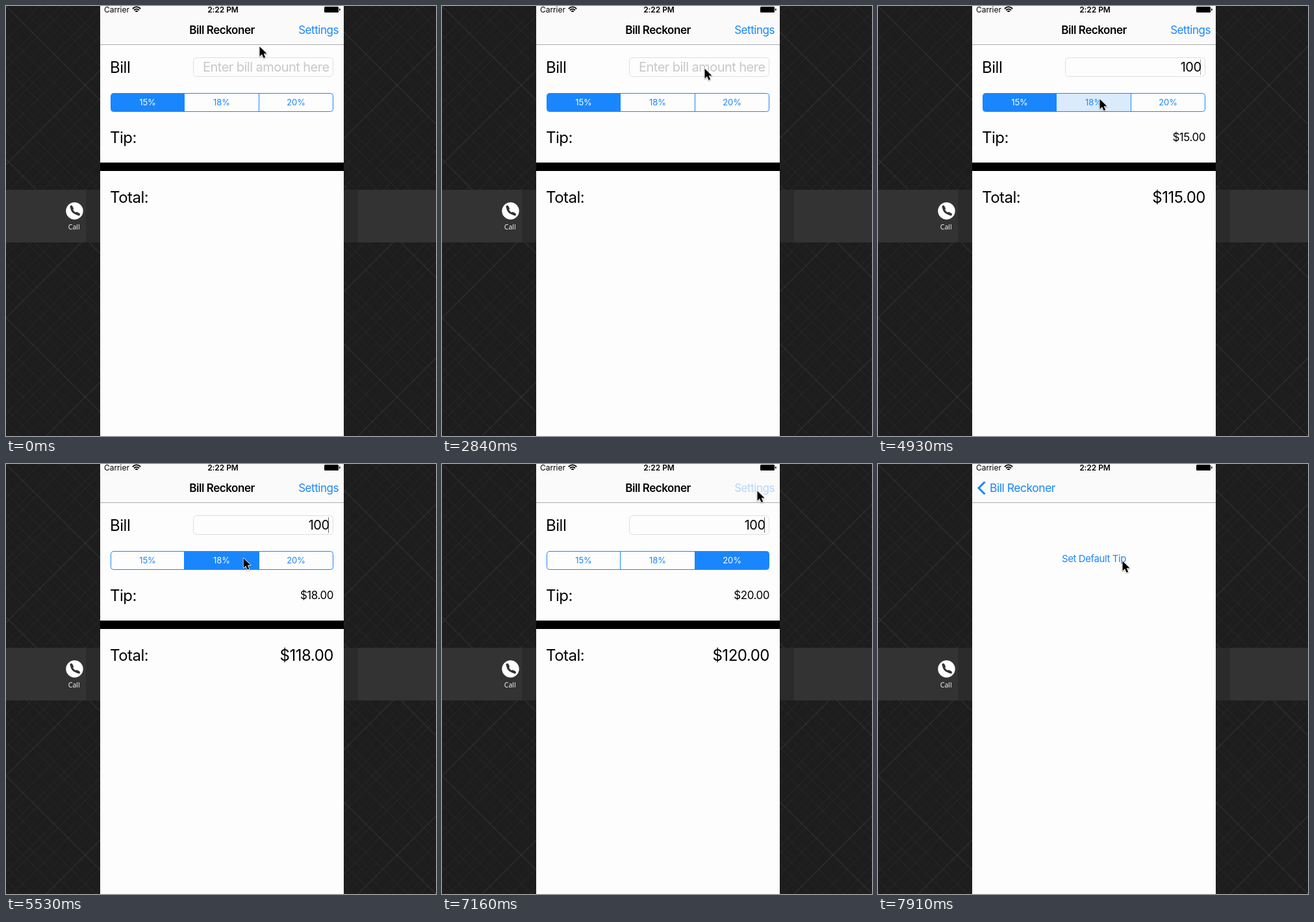
Write an HTML page with a canvas that moves like this. It is 662 by 662 pixels and loops after 8 s.

```html
<!DOCTYPE html>
<html lang="en">
<head>
<meta charset="utf-8">
<title>Bill Reckoner</title>
<style>
  html, body { margin: 0; width: 100%; height: 100%; overflow: hidden; background: #1d1d1d; }
  canvas { display: block; }
</style>
</head>
<body>
<canvas id="stage" width="662" height="662"></canvas>
<script>
const ctx = document.getElementById('stage').getContext('2d');
const LOOP = 8000, LEFT = 145, WIDTH = 375, RIGHT = LEFT + WIDTH, MID = LEFT + WIDTH / 2;
const BLUE = '#1a86fd', PAPER = '#fdfdfd', APP = 'Bill Reckoner';

const SHORT_TICKS = [17, 32, 40, 44];
const tickStart = n => 150 * n - 10 * SHORT_TICKS.filter(k => n >= k).length;
function tickAt(ms) {
  let n = 0;
  while (n < 53 && tickStart(n + 1) <= ms) n++;
  return n;
}

// Value of the last [tick, value] pair already reached
const at = (n, steps) => steps.reduce((v, [k, next]) => n >= k ? next : v, steps[0][1]);

const POINTER = [[3, 390, 62], [5, 404, 96], [29, 404, 96], [32, 341, 143], [36, 341, 143],
  [39, 434, 149], [43, 434, 149], [47, 485, 41], [50, 485, 41], [53, 376, 149]];
const TYPED = [[0, ''], [20, '1'], [22, '10'], [23, '100']];
const CARET = [[0, 0], [8, 1], [11, .5], [12, 0], [15, 1], [18, .5], [19, 0], [20, 1], [27, .5],
  [28, 0], [30, 1], [33, .6], [34, 0], [37, 1], [40, .5], [41, 0], [44, 1]];
const RATE = [[0, 15], [34, 18], [41, 20]];
const FILLS = [
  [[0, 1], [34, .28], [35, 0]],
  [[0, 0], [33, .15], [34, .8], [35, 1], [41, .28], [42, 0]],
  [[0, 0], [40, .15], [41, .8], [42, 1]]
];

function pushAt(n) {
  if (n <= 48) return 0;
  if (n >= 52) return 1;
  const x = 11.5 * .15 * (n - 48);
  return 1 - (1 + x) * Math.exp(-x);
}

function rect(x, y, w, h, color) {
  ctx.fillStyle = color;
  ctx.fillRect(x, y, w, h);
}

function rounded(x, y, w, h, r) {
  ctx.beginPath();
  ctx.roundRect(x, y, w, h, r);
}

function stroke(d, color, width, cap = 'butt') {
  ctx.strokeStyle = color;
  ctx.lineWidth = width;
  ctx.lineCap = cap;
  ctx.stroke(new Path2D(d));
}

function text(s, x, y, size, { color = '#000', align = 'left', weight = 400, alpha = 1 } = {}) {
  ctx.save();
  ctx.globalAlpha *= alpha;
  ctx.font = `${weight} ${size}px Inter, Roboto, sans-serif`;
  ctx.letterSpacing = size * (size < 14 ? -.005 : size > 20 ? -.02 : -.027) + 'px';
  ctx.textAlign = align;
  ctx.fillStyle = color;
  ctx.fillText(s, x, y);
  const width = ctx.measureText(s).width;
  ctx.restore();
  return width;
}

function drawBackdrop() {
  rect(0, 0, 662, 662, '#1d1d1d');
  for (let i = -42; i < 84; i++) {
    const c = i * 16 + (i % 2 ? 4 : 0);
    const color = `rgba(255,255,255,${i % 5 ? .025 : .05})`;
    stroke(`M${c} 0l662 662M${c} 0l-662 662`, color, i % 3 ? 1 : 2);
  }
  rect(0, 283, 662, 81, '#2b2b2b');
  rect(0, 283, 123, 81, '#333');
  rect(542, 283, 120, 81, '#333');
  ctx.fillStyle = '#fff';
  ctx.beginPath();
  ctx.arc(105.5, 315.5, 13.2, 0, 7);
  ctx.fill();
  stroke('M100.5 310Q101.5 318.5 110.5 320.5', '#333', 3);
  stroke('M100.5 309L102 312M109 319.2L112 320.8', '#333', 4, 'round');
  ctx.font = '10.5px "Open Sans", sans-serif';
  ctx.letterSpacing = '0px';
  ctx.textAlign = 'center';
  ctx.fillStyle = '#fff';
  ctx.fillText('Call', 104.7, 344);
}

function drawSegments(n) {
  const edges = [161.5, 274.5, 389.5, 503.5];
  ctx.save();
  rounded(161.5, 134.5, 342, 28, 4);
  ctx.clip();
  FILLS.forEach((steps, i) => {
    ctx.globalAlpha = at(n, steps);
    rect(edges[i], 134, edges[i + 1] - edges[i], 29, BLUE);
  });
  ctx.restore();
  rounded(161.5, 134.5, 342, 28, 4);
  ctx.strokeStyle = BLUE;
  ctx.lineWidth = 1;
  ctx.stroke();
  stroke('M274.5 134V163M389.5 134V163', BLUE, 1);
  ['15%', '18%', '20%'].forEach((label, i) => {
    const fill = at(n, FILLS[i]);
    const color = fill === 1 ? '#fff' : fill > .5 ? '#b9d8fc' : fill > .2 ? '#5aa5f7' : BLUE;
    text(label, (edges[i] + edges[i + 1]) / 2, 153, 13, { color, align: 'center' });
  });
}

function drawBillPage(n) {
  rect(LEFT, 60, WIDTH, 602, PAPER);
  const right = { align: 'right' };
  text('Bill', 160, 103, 24);
  text('Tip:', 160, 211, 24);
  text('Total:', 160, 302.5, 24);

  rounded(288.5, 79.5, 215, 29, 5);
  ctx.strokeStyle = '#dfdfdf';
  ctx.lineWidth = 1;
  ctx.stroke();
  const typed = at(n, TYPED);
  if (typed) {
    const tip = typed * at(n, RATE) / 100;
    text(typed, 497.5, 101, 20, right);
    text('$' + tip.toFixed(2), 504, 208, 17, right);
    text('$' + (+typed + tip).toFixed(2), 504, 302.5, 24, right);
  } else {
    text('Enter bill amount here', 497.5, 101, 20, { ...right, color: '#c8c8cc' });
  }
  rect(496, 82, 1, 24, `rgba(50,60,70,${.8 * at(n, CARET)})`);

  drawSegments(n);
  rect(LEFT, 241, WIDTH, 13, '#000');
}

function drawSettingsPage(p) {
  const x = WIDTH * (1 - p);
  rect(LEFT, 60, WIDTH, 602, `rgba(0,0,0,${.1 * p})`);
  ctx.save();
  ctx.translate(x, 0);
  if (p < 1) {
    const shade = ctx.createLinearGradient(LEFT - 6, 0, LEFT, 0);
    shade.addColorStop(0, 'rgba(0,0,0,0)');
    shade.addColorStop(1, 'rgba(0,0,0,.06)');
    rect(LEFT - 6, 60, 6, 602, shade);
  }
  rect(LEFT, 60, WIDTH, 602, PAPER);
  text('Set Default Tip', MID, 150.5, 15, { color: BLUE, align: 'center' });
  ctx.restore();
}

function drawNavBar(n, p) {
  rect(LEFT, 0, WIDTH, 59, '#fafafa');
  rect(LEFT, 59, WIDTH, 1, '#adadad');

  text('Carrier', 151, 9.5, 12);
  for (const r of [1.5, 4.7, 7.9]) {
    ctx.beginPath();
    ctx.arc(201, 9.3, r, -Math.PI * .75, -Math.PI * .25);
    ctx.strokeStyle = '#000';
    ctx.lineWidth = 1.9;
    ctx.stroke();
  }
  text('2:22 PM', 334, 9.5, 12, { weight: 600, align: 'center' });
  ctx.fillStyle = '#000';
  rounded(490, 1, 22, 9, 1.5);
  ctx.fill();
  rect(513, 4, 1.5, 3, '#000');

  // The title slides over and becomes the back label
  const titleX = MID - 55 + (172 - MID + 55) * p;
  if (p < 1) text(APP, titleX + 55, 43, 17, { weight: 600, align: 'center', alpha: (1 - p) ** 1.5 });
  text(APP, titleX, 43, 17.5, { color: BLUE, alpha: p });
  ctx.globalAlpha = p ** 10;
  stroke('M164.5 27.5L155 37L164.5 46.5', BLUE, 3);
  ctx.globalAlpha = 1;
  const fade = n === 48 ? .3 : 1 - p;
  text('Settings', 512, 43, 17, { color: BLUE, align: 'right', alpha: fade });
}

function drawPointer(n) {
  let i = POINTER.findIndex(([k]) => k >= n);
  const [k1, x1, y1] = POINTER[i], [k0, x0, y0] = POINTER[Math.max(0, i - 1)];
  const u = i ? (n - k0) / (k1 - k0) : 1;
  const e = u * u * (3 - 2 * u);
  const arrow = new Path2D('M.5 .5V15.5L4 12.2L6.6 18L9.2 16.9L6.7 11.3H11.5Z');
  ctx.save();
  ctx.translate(x0 + (x1 - x0) * e, y0 + (y1 - y0) * e);
  ctx.shadowColor = 'rgba(0,0,0,.35)';
  ctx.shadowBlur = 2;
  ctx.shadowOffsetY = 1;
  ctx.strokeStyle = '#fff';
  ctx.lineWidth = 1.6;
  ctx.lineJoin = 'round';
  ctx.stroke(arrow);
  ctx.shadowColor = 'transparent';
  ctx.fillStyle = '#000';
  ctx.fill(arrow);
  ctx.restore();
}

function draw(ms) {
  const n = tickAt(ms), p = pushAt(n);
  drawBackdrop();
  ctx.save();
  ctx.beginPath();
  ctx.rect(LEFT, 0, WIDTH, 662);
  ctx.clip();
  ctx.save();
  ctx.translate(-.3 * WIDTH * p, 0);
  drawBillPage(n);
  ctx.restore();
  if (p) drawSettingsPage(p);
  drawNavBar(n, p);
  drawPointer(n);
  ctx.restore();
}

const began = performance.now();
function loop() {
  draw((performance.now() - began) % LOOP);
  requestAnimationFrame(loop);
}
loop();
</script>
</body>
</html>
```
